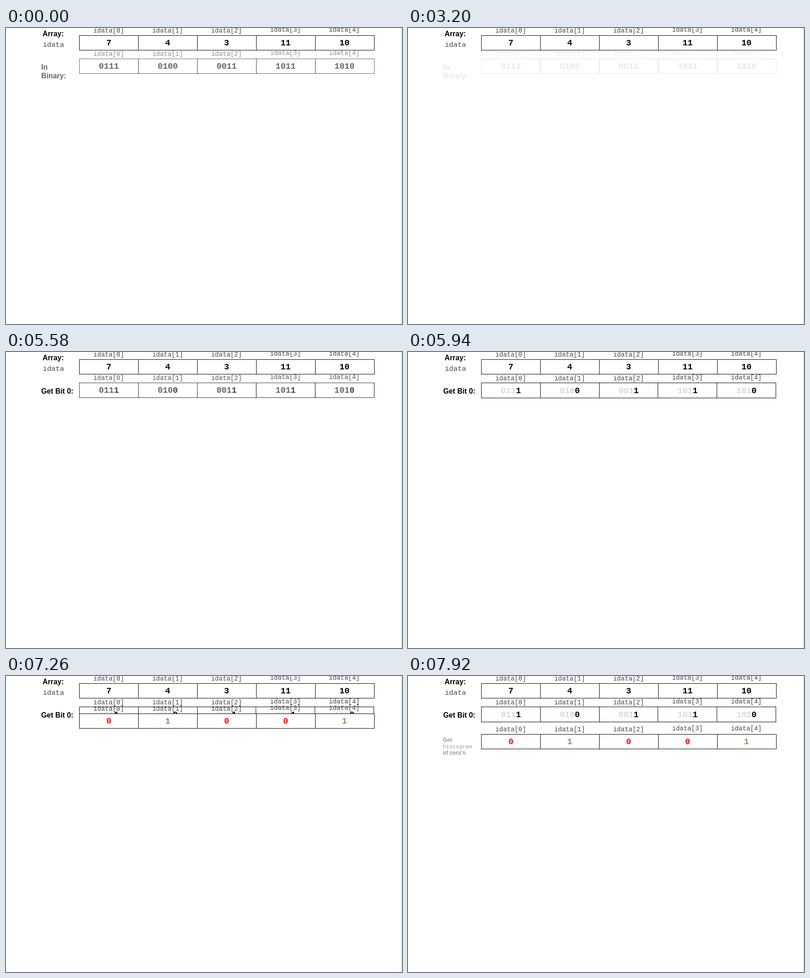
Write an HTML page with a canvas that moves like this. It is 866 by 647 pixels and loops after 8000 ms.

```html
<!DOCTYPE html>
<html lang="en">
<head>
<meta charset="utf-8">
<title>Bit 0 of an array</title>
<style>
html, body { margin: 0; width: 100%; height: 100%; overflow: hidden; background: #fff; }
canvas { display: block; }
</style>
</head>
<body>
<canvas id="stage" width="866" height="647"></canvas>
<script>
const ctx = document.getElementById('stage').getContext('2d');
const LOOP = 8000;
const SANS = '"Liberation Sans", Arial, sans-serif';
const MONO = '"Courier New", "Liberation Mono", monospace';
const THIN = '#444';
const values = [7, 4, 3, 11, 10];
const binary = values.map(v => v.toString(2).padStart(4, '0'));
const flipped = values.map(v => String(1 - v % 2));
const bitColor = s => s === '0' ? '#f00' : '#6aa84f';

// The picture only changes at these times.
const steps = [0, 60, 270, 1320, 3200, 3320, 3420, 3520, 3620,
  4540, 4660, 4760, 4860, 4960, 5580, 5640, 5720, 5800, 5860, 5940,
  6680, 6760, 6860, 7020, 7100, 7180, 7260, 7320, 7420, 7520, 7640, 7740, 7920];

// Opacity that jumps to `from` at `start` and then rises evenly to 1.
const fade = (t, start, from, rate = 0.0023) =>
  t < start ? 0 : Math.min(1, from + (t - start) * rate);

function text(str, x, y, font, color = '#000', align = 'left') {
  ctx.font = font;
  ctx.fillStyle = color;
  ctx.textAlign = align;
  ctx.fillText(str, x, y);
}

function label(str, x, y, alpha = 1, size = 15.8) {
  ctx.globalAlpha = alpha;
  text(str, x, y, `bold ${size}px ${SANS}`);
}

function row(cells, top, alpha, { color = () => '#000', height = 32, left = 160, pitch = 129, drop = 0 } = {}) {
  if (alpha <= 0) return;
  ctx.globalAlpha = alpha;
  cells.forEach((cell, i) => {
    const x = Math.floor(left + pitch * i) + 0.5;
    const right = Math.floor(left + pitch * (i + 1)) + 0.5;
    const mid = 225 + 128.8 * i;
    ctx.fillStyle = '#fff';
    ctx.fillRect(x, top, right - x, height);
    ctx.strokeRect(x, top, right - x, height);
    text(`idata[${i}]`, mid - 0.3, top - 7 + drop - (i > 2 ? 1.5 : 0), `14px ${MONO}`, THIN, 'center');
    [...cell].forEach((ch, j) =>
      text(ch, mid + (j - (cell.length - 1) / 2) * 11, top + 21.5 + drop,
        `bold 18.3px ${MONO}`, color(ch, j), 'center'));
  });
}

function draw(t) {
  ctx.globalAlpha = 1;
  ctx.fillStyle = '#fff';
  ctx.fillRect(0, 0, 866, 647);
  ctx.fillStyle = '#b7b7b7';
  ctx.fillRect(865, 0, 1, 647);
  ctx.strokeStyle = '#000';
  ctx.lineWidth = 1;

  label('Array:', 80, 18);
  text('idata', 80.5, 41, `15.5px ${MONO}`, THIN);
  row(values.map(String), 16.5, 1);

  const shown = t < 1320 ? fade(t, 0, 0.6) : fade(t, 3200, 0.09);
  const renamed = fade(t, 4540, 0.3, 1 / 600);
  const dimmed = fade(t, 5580, 0.18);
  const result = fade(t, 6680, 0.05);

  row(binary, 67.5, shown * (1 - dimmed));
  label('In', 77, 91, shown * (1 - renamed));
  label('Binary:', 77, 110, shown * (1 - renamed));
  label('Get Bit 0:', 77, 91, renamed);

  row(binary, 67.5, dimmed, {
    color: (ch, j) => j < 3 ? '#d9d9d9' : '#000',
    height: 33, left: 160.2, pitch: 128.9, drop: 1
  });

  // The result row slides down out of the row above.
  const top = Math.max(68, Math.floor(82 + (t - 7260) / 14.5)) + 0.5;
  row(flipped, top, result, { color: bitColor });

  if (t >= 7920) {
    label('Get', 76, 144, 0.4, 12.3);
    text('histogram', 76, 158, `11.8px ${MONO}`);
    label("of zero's", 76, 172, 0.4, 12.3);
  }
}

const begin = performance.now();
function tick() {
  const t = (performance.now() - begin) % LOOP;
  draw(steps.findLast(s => s <= t) ?? 0);
  requestAnimationFrame(tick);
}
tick();
</script>
</body>
</html>
```
